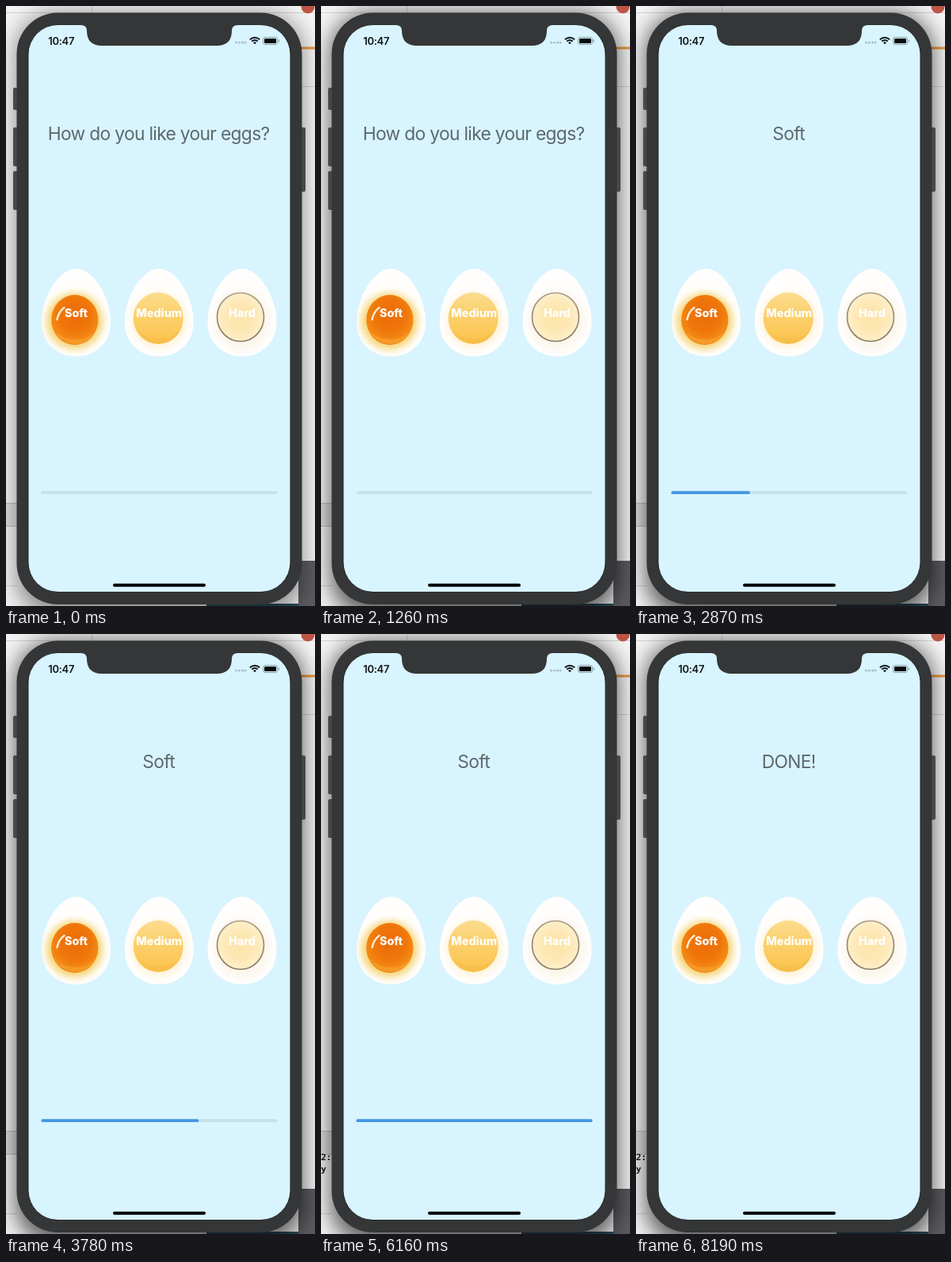
Write an HTML page that moves like this. It is 390 px wide and 756 px high and loops after 8260 ms.

```html
<!DOCTYPE html>
<html lang="en">
<head>
<meta charset="utf-8">
<title>Egg timer</title>
<style>
html, body { margin: 0; width: 100%; height: 100%; overflow: hidden; background: #f4f4f4; }
svg { display: block; width: 390px; height: 756px; }
text { font-family: Inter, Roboto, sans-serif; text-anchor: middle; }
.title { font-size: 22.8px; letter-spacing: -.68px; fill: #5d696e; }
.label { font-size: 14.4px; font-weight: 800; fill: #fff; }
.stop { font-size: 23.3px; font-weight: 800; fill: #fff; }
.clock { font-size: 13px; font-weight: 600; letter-spacing: -.3px; fill: #101416; }
.log text { font: bold 11px "DejaVu Sans Mono", monospace; text-anchor: start; fill: #111; }
</style>
</head>
<body>
<svg viewBox="0 0 390 756">
  <defs>
    <path id="egg" d="M0-55C23-55 43.5-17 43.5 12C43.5 40 23 55.500 0 55.500S-43.500 40-43.500 12C-43.500-17-23-55 0-55Z"/>
    <clipPath id="shell"><use href="#egg"/></clipPath>
    <filter id="blur" x="-50%" y="-50%" width="200%" height="200%"><feGaussianBlur stdDeviation="4.500"/></filter>
    <filter id="shade" x="-20%" y="-20%" width="140%" height="140%"><feGaussianBlur stdDeviation="14"/></filter>
    <radialGradient id="soft" cx=".5" cy=".4" r=".62">
      <stop offset="0" stop-color="#ec6c08"/><stop offset=".55" stop-color="#ef760a"/>
      <stop offset=".88" stop-color="#f58d18"/><stop offset="1" stop-color="#e67b12"/>
    </radialGradient>
    <linearGradient id="medium" x2="0" y2="1">
      <stop offset="0" stop-color="#fbdc8e"/><stop offset=".35" stop-color="#fbd272"/>
      <stop offset=".8" stop-color="#fcc857"/><stop offset="1" stop-color="#f9be45"/>
    </linearGradient>
    <radialGradient id="hard">
      <stop offset="0" stop-color="#fde4a8"/><stop offset=".6" stop-color="#fde8b5"/>
      <stop offset="1" stop-color="#feefcb"/>
    </radialGradient>
    <linearGradient id="rim" x2="0" y2="1">
      <stop offset="0" stop-color="#a99d86"/><stop offset="1" stop-color="#8a7a62"/>
    </linearGradient>
  </defs>

  <!-- Desktop behind the phone -->
  <rect width="390" height="756" fill="#f4f4f4"/>
  <path d="M0 8.500H390M108.500 0V8M374 101.500H390M0 730.500H14" stroke="#d2d2d2"/>
  <path d="M0 626H20V655H0Z" fill="#dedede"/>
  <path d="M0 626.500H20M0 655.500H20" stroke="#bcbcbc"/>
  <path d="M370 53H390" stroke="#e9963f" stroke-width="3"/>
  <path d="M253 753H369V699H390V756H253Z" fill="#5b5c60"/>
  <path d="M253 754.500H369" stroke="#2c4d5c" stroke-width="3"/>
  <rect id="shadow" x="12" y="9" width="363" height="760" rx="50" filter="url(#shade)"/>
  <circle cx="381" cy="1" r="8.500" fill="#bd5547"/>
  <g id="log" class="log"><text x="0" y="663">2:</text><text x="0" y="678">y</text></g>

  <!-- Phone -->
  <g fill="#47484a">
    <rect x="9" y="103" width="7" height="28" rx="2"/>
    <rect x="9" y="153" width="7" height="49" rx="2"/>
    <rect x="9" y="208" width="7" height="49" rx="2"/>
    <rect x="371" y="153" width="7" height="81" rx="2"/>
  </g>
  <rect x="13.500" y="8.500" width="360" height="745.500" rx="52" fill="#353637"/>
  <rect x="27.500" y="23.500" width="332" height="715" rx="38" fill="#202325"/>
  <rect x="28.500" y="24" width="330" height="714" rx="37" fill="#d8f4fe"/>
  <path d="M94 23H293V24Q285 24 285 31Q285 50 266 50H121Q102 50 102 31Q102 24 94 24Z" fill="#353637"/>
  <text class="clock" x="69.700" y="48.500">10:47</text>
  <g fill="#a9bfc8">
    <circle cx="290.500" cy="46" r="1.500"/><circle cx="294.500" cy="46" r="1.500"/>
    <circle cx="298.500" cy="46" r="1.500"/><circle cx="302" cy="46" r="1.500"/>
  </g>
  <g fill="none" stroke="#101416" stroke-width="1.900">
    <path d="M307.800 42.300Q314 37 320.200 42.300M310.200 44.600Q314 41.400 317.800 44.600"/>
    <path d="M312 46L314 48.300L316 46Q314 44.400 312 46Z" fill="#101416" stroke="none"/>
  </g>
  <rect x="324.500" y="39.500" width="18" height="9" rx="2.500" fill="none" stroke="#8ba0a8"/>
  <rect x="326" y="41" width="15" height="6" rx="1.300" fill="#060809"/>
  <path d="M344.300 42.500V45.500" stroke="#8ba0a8" stroke-width="1.300"/>
  <rect x="135" y="727.700" width="117" height="4" rx="2"/>

  <!-- Eggs -->
  <g transform="translate(88.500 386)">
    <use href="#egg" fill="#fffefc"/>
    <g clip-path="url(#shell)">
      <ellipse cx="-2" cy="11" rx="36" ry="36" fill="#f5d26e" opacity=".9" filter="url(#blur)"/>
    </g>
    <ellipse cx="-1.700" cy="9.500" rx="29.700" ry="31.500" fill="url(#soft)"/>
    <path d="M-27 24Q-17 40 0 40Q16 39 24 24Q15 34-1 34Q-17 34-27 24Z" fill="#f9a531" opacity=".6"/>
    <path d="M-24 9Q-22-1-15-6" fill="none" stroke="#ffe9cf" stroke-width="2.500" stroke-linecap="round"/>
    <text class="label" y="5.500">Soft</text>
  </g>
  <g transform="translate(193.200 386)">
    <use href="#egg" fill="#fffefc"/>
    <g clip-path="url(#shell)">
      <ellipse cy="10" rx="35" ry="35" fill="#fdf0cf" opacity=".8" filter="url(#blur)"/>
    </g>
    <ellipse cx="-1" cy="7.500" rx="31.500" ry="32.500" fill="url(#medium)"/>
    <path d="M-28 22Q-17 39 1 39Q19 38 28 20Q17 33 0 33Q-16 33-28 22Z" fill="#f5bd4c" opacity=".55"/>
    <text class="label" y="5.500">Medium</text>
  </g>
  <g transform="translate(298 386)">
    <use href="#egg" fill="#fffefd"/>
    <g clip-path="url(#shell)">
      <ellipse cy="10" rx="36" ry="38" fill="#faf4e8" opacity=".8" filter="url(#blur)"/>
    </g>
    <ellipse cx="-2" cy="6" rx="29.500" ry="30.500" fill="url(#hard)" stroke="url(#rim)" stroke-width="1.700"/>
    <text class="label" y="5.500">Hard</text>
  </g>

  <!-- Timer state -->
  <text id="title" class="title" x="192.600" y="168.500"></text>
  <g id="progress">
    <rect x="44.500" y="611.300" width="298" height="3.700" rx="1.850" fill="#c7e1ea"/>
    <rect id="bar" x="44.500" y="611.300" height="3.700" rx="1.850" fill="#4496e5"/>
  </g>
  <g id="stop">
    <rect x="161" y="594" width="64" height="38" fill="#fecb09"/>
    <text class="stop" x="193" y="621">STOP</text>
  </g>
</svg>
<script>
const LOOP = 8260, BAR_WIDTH = 298;
const $ = id => document.getElementById(id);
const show = (id, on) => $(id).setAttribute("visibility", on ? "visible" : "hidden");

// Start time in ms and the values that change from then on
const steps = [
  [0, { title: "How do you like your eggs?", bar: 0, shadow: .42 }],
  [910, { shadow: .62 }],
  [1470, { title: "Soft" }],
  [2450, { bar: 1 / 3 }],
  [3430, { bar: 2 / 3 }],
  [4480, { bar: 1 }],
  [5460, { log: true }],
  [6300, { title: "DONE!", done: true, stop: true }],
  [7560, { stop: false }]
];

function draw(now) {
  const t = now % LOOP;
  const state = Object.assign({}, ...steps.filter(([at]) => t >= at).map(([, change]) => change));
  if ($("title").textContent !== state.title) $("title").textContent = state.title;
  $("bar").setAttribute("width", BAR_WIDTH * state.bar);
  $("shadow").setAttribute("opacity", state.shadow);
  show("log", state.log);
  show("progress", !state.done);
  show("stop", state.stop);
}

const start = performance.now();
function tick() {
  draw(performance.now() - start);
  requestAnimationFrame(tick);
}
tick();
</script>
</body>
</html>
```
